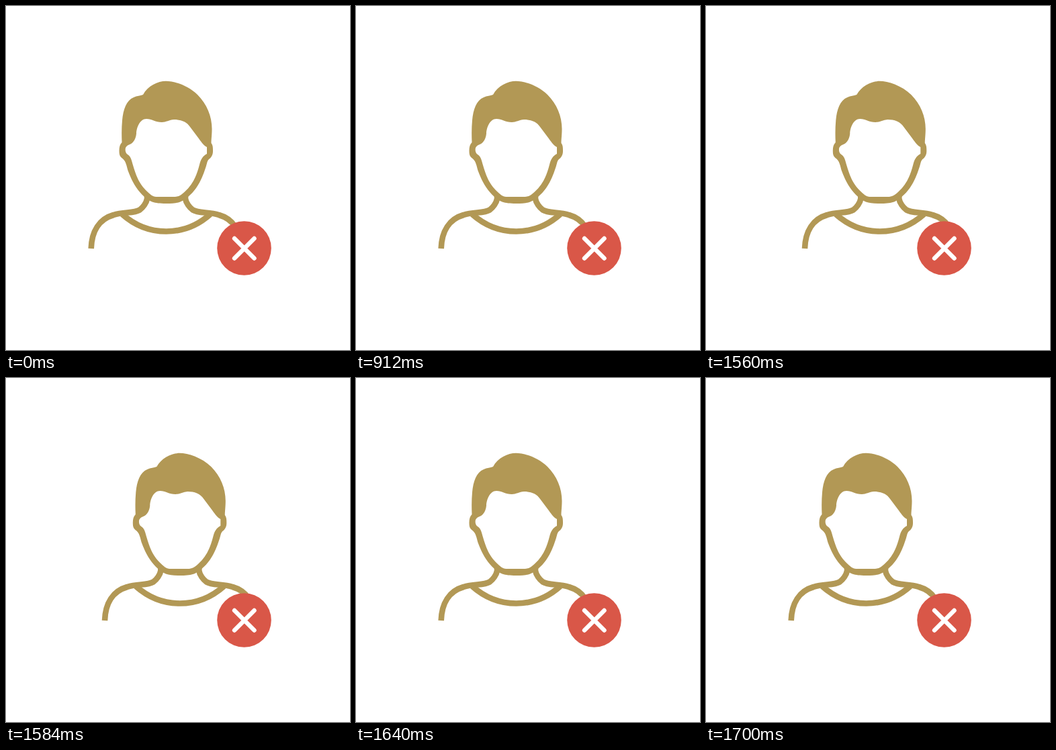
These frames come from a looping animation (512x512 px, 1.74 s). An HTML page:

```html
<!DOCTYPE html>
<html lang="en">
<head>
<meta charset="utf-8">
<title>Rejected user</title>
<style>
  html, body { margin: 0; width: 100%; height: 100%; overflow: hidden; background: #fff; }
  svg { display: block; width: 100%; height: 100%; }
</style>
</head>
<body>
<svg viewBox="0 0 512 512">
  <g id="person" fill="none" stroke="#b29855" stroke-width="8.6">
    <path fill="#b29855" stroke="none" fill-rule="evenodd" d="
      M172.500 203 C172 192 172 181 173 170 C174.500 154 179 140.500 190 136
      C195 133.500 200 133.500 204 132 C211 119 226 111.800 238 111.800
      C251 111.800 271 118.500 285 132 C299 146 306.500 164 306.500 183
      C306.500 192 305.500 198 305.500 204 C308 207 308 211 308 216
      C308 222 305 226 302 228 C299 231 299 236 297 241
      C291 260 283 274 271 284 C262 292 256 294 238 294
      C220 294 214 291 206 284 C194 273 187 260 181.500 245
      C179.500 238 178.500 231 173.500 227 C169.500 224 168.500 222 168.500 215 C168.500 210 169.500 206 172.500 203 Z
      M178 211 C177 215 178 219 181 221 C186 224 187 230 189 237
      C194 254 199 266 210 276 C217 282.500 219 284 226 284
      L250 284 C257 284 260 282 266 276.500 C278 266 284 252 288 236
      C290 228 293 223 299 220 L299 210 C293 207 290 201 286 196
      L274 180 C269 172 260 169 250 169 C243 169.500 238 173 232 173
      C222 173 217 168 209 168 C199 168 194 182 194 190
      C193 200 188 205 182 207 C180 208 179 209 178 211 Z"/>
    <path d="M210 282 L210 287 C209 293 204 300 199 303.500 C190 309 175 306 160 311 C139 317 127.500 335 126.700 361"/>
    <path d="M267 282 L267 287 C268 293 273 300 278 303.500 C287 309 302 306 317 311 C338 317 349.500 335 350.300 361"/>
    <path d="M173 310 C191 326 212 335.500 238.500 335.500 C265 335.500 286 326 304 310"/>
  </g>
  <circle cx="354.500" cy="360.500" r="40.300" fill="#d95748"/>
  <path d="M340 346 L369.500 375.500 M369.500 346 L340 375.500" fill="none" stroke="#fff" stroke-width="6.4" stroke-linecap="round"/>
</svg>
<script>
  const LOOP = 1740, SHAKE_START = 1520, STEP = 40;
  const offsets = [-20.6, 20.3, -20.6];
  const person = document.getElementById('person');
  const start = performance.now();

  function draw(ms) {
    const step = Math.floor((ms - SHAKE_START) / STEP);
    person.setAttribute('transform', `translate(${offsets[step] || 0} 0)`);
  }

  function tick() {
    draw((performance.now() - start) % LOOP);
    requestAnimationFrame(tick);
  }
  tick();
</script>
</body>
</html>
```
